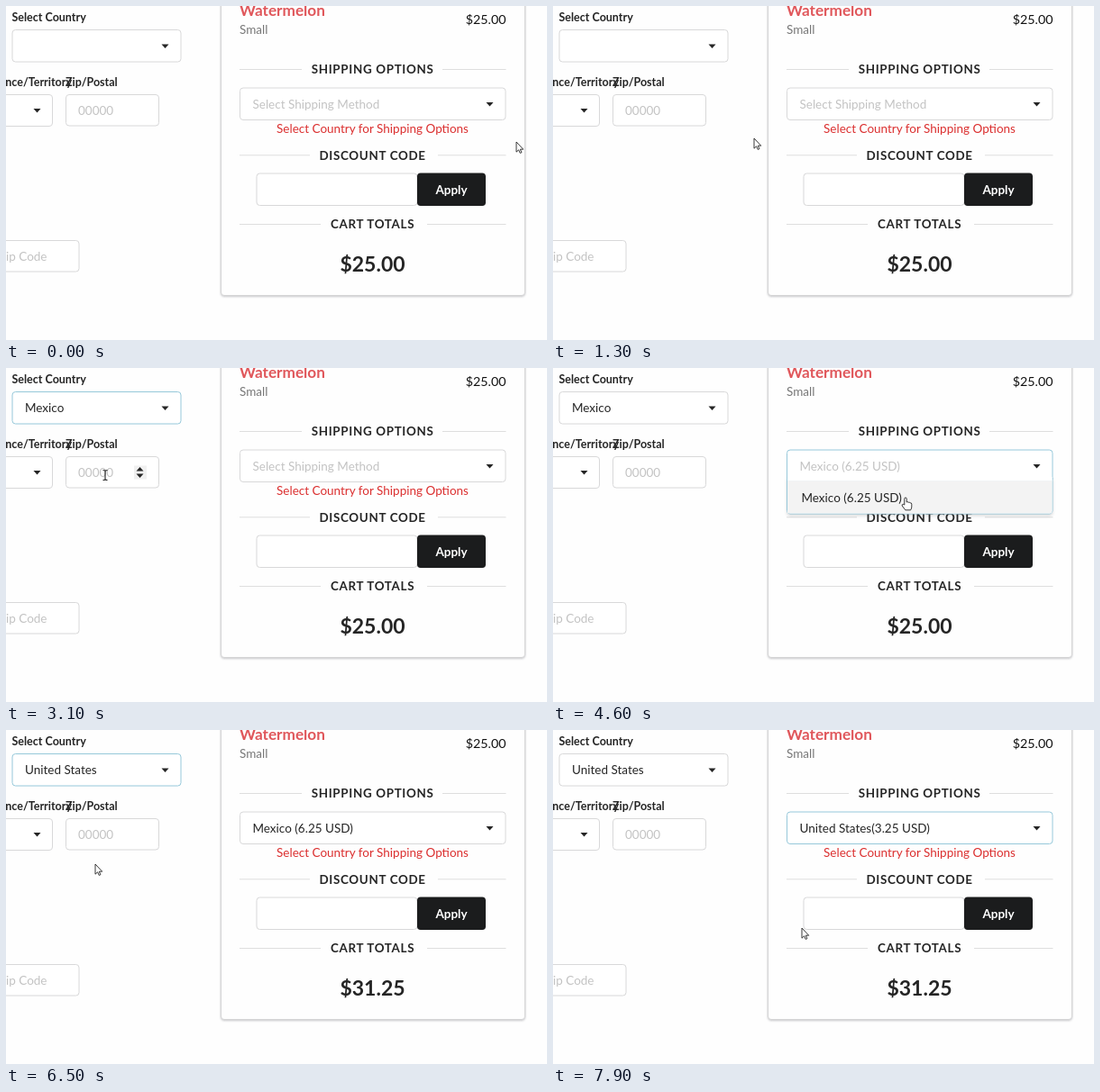
These frames come from a looping animation (600x371 px, 8000 ms). An HTML page:

```html
<!DOCTYPE html>
<html lang="en">
<head>
<meta charset="utf-8">
<title>Checkout</title>
<style>
  html, body { margin: 0; width: 100%; height: 100%; overflow: hidden; background: #fefefe; }
  svg { display: block; width: 600px; height: 371px; font: 13.5px Lato, sans-serif; fill: #252525; }
  .label { font-size: 12.5px; font-weight: 700; }
  .head { font-size: 13.4px; font-weight: 700; letter-spacing: .05em; text-anchor: middle; }
  .mid { text-anchor: middle; }
  .end { text-anchor: end; }
  .bold { font-weight: 700; }
  .big { font-size: 17.2px; font-weight: 700; }
  .total { font-size: 23px; font-weight: 700; text-anchor: middle; }
  .hint { fill: #c3c3c3; }
  .error { fill: #db2f2f; text-anchor: middle; }
  .box { fill: #fff; stroke: #d8d8d9; }
  .focus { stroke: #96c8da; }
  .rule { stroke: #dedede; }
  .shade { filter: drop-shadow(0 2px 1.5px rgba(34, 36, 38, .15)); }
  .card { fill: #fefefe; stroke: #d4d4d5; filter: drop-shadow(0 1px 1px rgba(160, 160, 165, .6)); }
  #cursor path { fill: #fff; stroke: #222; stroke-width: .9; stroke-linejoin: round; }
  #cursor .beam { fill: none; stroke-width: 1.1; }
</style>
</head>
<body>
<svg viewBox="0 0 600 371">
  <g id="page"></g>
  <g id="cursor">
    <path id="arrow" d="M0 0V11.2L2.6 8.8 4.2 12.4 5.9 11.7 4.3 8.2H7.7Z"/>
    <path id="beam" class="beam" d="M-2.5-5.5Q0-5.5 0-4.5Q0-5.5 2.5-5.5M0-4.5V4.5M-2.5 5.5Q0 5.5 0 4.5Q0 5.5 2.5 5.5"/>
    <path id="hand" d="M-1.2 8V1.2Q-1.2 0 0 0T1.2 1.2V5Q2.3 4.2 3.2 5.3Q4.6 4.6 5.2 5.9Q6.8 5.6 6.8 7.2V10Q6.8 12 5.6 13.8H-.2L-3.8 9Q-4.2 7.6-3 7.3Q-2.2 7.2-1.2 8Z"/>
  </g>
</svg>
<script>
const LOOP = 8000, STEP = 100;
const countries = ["Canada", "Mexico", "United States"];
const $ = id => document.getElementById(id);

// Pointer stops: time, x, y
const stops = [
  [0, 566, 151], [100, 566, 151], [1300, 223, 147], [1700, 118, 48], [1900, 114, 48],
  [2500, 110, 119], [3200, 110, 119], [3600, 290, 160], [3700, 290, 160],
  [4100, 380, 110], [4300, 384, 112], [4600, 391, 144], [4800, 391, 144],
  [5500, 80, 12], [5800, 96, 45], [6000, 98, 48], [6400, 99, 149], [6500, 99, 149],
  [6800, 140, 160], [6900, 140, 160], [7200, 330, 110], [7300, 332, 112],
  [7500, 328, 145], [7600, 328, 145], [7800, 276, 220], [LOOP, 276, 220]
];

function pointerAt(t) {
  const i = Math.max(1, stops.findIndex(s => s[0] > t));
  const [t0, x0, y0] = stops[i - 1], [t1, x1, y1] = stops[i];
  const p = (t - t0) / (t1 - t0), e = p * p * (3 - 2 * p);
  return { x: x0 + (x1 - x0) * e, y: y0 + (y1 - y0) * e };
}

const within = (v, a, b) => v >= a && v < b;

function stateAt(t, p) {
  const countryOpen = within(t, 1800, 2800) || within(t, 5900, 6500);
  const shipOpen = within(t, 4200, 4700) || within(t, 7300, 7600);
  return {
    country: t < 2800 ? "" : t < 6500 ? "Mexico" : "United States",
    method: t < 4500 ? "" : t < 7600 ? "Mexico (6.25 USD)" : "United States(3.25 USD)",
    option: t < 6500 ? "Mexico (6.25 USD)" : "United States(3.25 USD)",
    countryOpen, shipOpen,
    countryFocus: within(t, 1800, 3900) || within(t, 5900, 7200),
    shipFocus: within(t, 4200, 5900) || t >= 7300,
    shipped: within(t, 4700, 6500),
    total: t < 4700 ? "$25.00" : "$31.25",
    row: countryOpen ? Math.floor((p.y - 62) / 36) : -1,
    zipHover: !countryOpen && within(p.x, 66, 170) && within(p.y, 98, 133)
  };
}

const text = (x, y, cls, s) => `<text x="${x}" y="${y}" class="${cls}">${s}</text>`;
const box = (x, y, w, h, cls = "") =>
  `<rect x="${x}" y="${y}" width="${w}" height="${h}" rx="3.5" class="box ${cls}"/>`;
const caret = (x, y, s = 4) => `<path d="M${x - s} ${y - s / 2}h${2 * s}l${-s} ${s * 1.1}z"/>`;
const heading = (y, left, right, s) =>
  `<path class="rule" d="M259 ${y}H${left}M${right} ${y}H554.5"/>` + text(406.6, y + 4.8, "head", s);

function select(x, y, w, value, hint, open, focus) {
  return box(x, y, w, 35.5, focus ? "focus" : "") +
    text(x + 14, y + 22.9, value && !open ? "" : "hint", value || hint) +
    caret(x + w - 17.5, y + 18);
}

function menu(x, y, w, items, hot, chosen) {
  const h = items.length * 36;
  const rows = items.map((s, i) => {
    const top = y + i * 36;
    return (i === hot ? `<rect x="${x + .5}" y="${top}" width="${w - 1}" height="35.5" fill="#f3f3f3"/>` : "") +
      (i ? `<path stroke="#fafafa" d="M${x + .5} ${top}h${w - 1}"/>` : "") +
      text(x + 16, top + 23.4, s === chosen ? "bold" : "", s);
  }).join("");
  return `<path class="box focus shade" d="M${x} ${y - 4}V${y + h - 3.5}q0 3.5 3.5 3.5h${w - 7}q3.5 0 3.5-3.5V${y - 4}"/>
    <path fill="#fff" d="M${x + .5} ${y - 5}h${w - 1}v5h${1 - w}z"/>
    <path stroke="#e2e9eb" d="M${x + .5} ${y}h${w - 1}"/>` + rows;
}

function draw(s) {
  const dy = s.shipped ? -18.5 : 0, low = s.shipped ? 28 : 0;
  return [
    text(6.5, 17, "label", "Select Country"),
    select(7, 26.5, 187, s.country, "", s.countryOpen, s.countryFocus),
    text(73, 89.3, "label end", "State/Province/Territory"),
    text(66, 89.3, "label", "Zip/Postal"),
    box(-135, 98.5, 186.5, 35),
    caret(34.5, 116),
    box(66.5, 98.5, 103, 34.5),
    text(80, 121, "hint", "00000"),
    s.zipHover ? `<rect x="142" y="108.5" width="14" height="15" fill="#f0f0f0"/>
      <path d="M144.5 114.5h8l-4-4.5zM144.5 117.5h8l-4 4.5z"/>` : "",
    box(-100, 260.5, 181, 34.5),
    text(45.5, 282.5, "hint end", "Zip Code"),
    `<rect class="card" x="238.5" y="-20" width="337" height="${341.5 + low}" rx="3.5"/>`,
    `<g fill="#e0575b">${text(259, 11, "big", "Watermelon")}</g>`,
    `<g fill="#777">${text(259, 31, "", "Small")}</g>`,
    `<g font-size="14.3" fill="#111">${text(554.5, 19.5, "end", "$25.00")}</g>`,
    heading(70.5, 328, 484, "SHIPPING OPTIONS"),
    s.shipped ? "" : text(406.5, 141.2, "error", "Select Country for Shipping Options"),
    `<g transform="translate(0 ${dy})">`,
    heading(165.8, 337, 479, "DISCOUNT CODE"),
    box(278, 186, 178, 35.5),
    `<rect x="456" y="185.5" width="76" height="36.5" rx="3.8" fill="#1b1c1d"/>`,
    `<g fill="#fff">${text(494, 209, "bold mid", "Apply")}</g>`,
    heading(242.5, 349, 467, "CART TOTALS"),
    "</g>",
    s.shipped ? `<g fill="#b5cc2e">${text(406.5, 272, "big mid", "(Shipping) + 6.25")}</g>` : "",
    text(406.5, 295.4 + low, "total", s.total),
    select(259.5, 91, 294.5, s.method, "Select Shipping Method", s.shipOpen, s.shipFocus),
    s.shipOpen ? menu(259.5, 126, 294.5, [s.option], 0) : "",
    s.countryOpen ? menu(7, 62, 187, countries, s.row, s.country) : ""
  ].join("");
}

function pointerKind(s, p) {
  const overCountry = within(p.x, 7, 194) && within(p.y, 26, s.countryOpen ? 170 : 62);
  const overShip = within(p.x, 259, 554) && within(p.y, 90, s.shipOpen ? 162 : 127);
  if (overCountry || overShip) return "hand";
  return s.zipHover ? "beam" : "arrow";
}

let lastKey = "";
const start = performance.now();

function frame(now) {
  const t = Math.floor(Math.max(0, now - start) % LOOP / STEP) * STEP;
  const p = pointerAt(t), s = stateAt(t, p), key = JSON.stringify(s);
  if (key !== lastKey) {
    $("page").innerHTML = draw(s);
    lastKey = key;
  }
  const kind = pointerKind(s, p);
  for (const id of ["arrow", "beam", "hand"]) $(id).style.display = id === kind ? "" : "none";
  $("cursor").setAttribute("transform", `translate(${p.x.toFixed(1)} ${p.y.toFixed(1)})`);
  requestAnimationFrame(frame);
}
frame(start);
</script>
</body>
</html>
```
